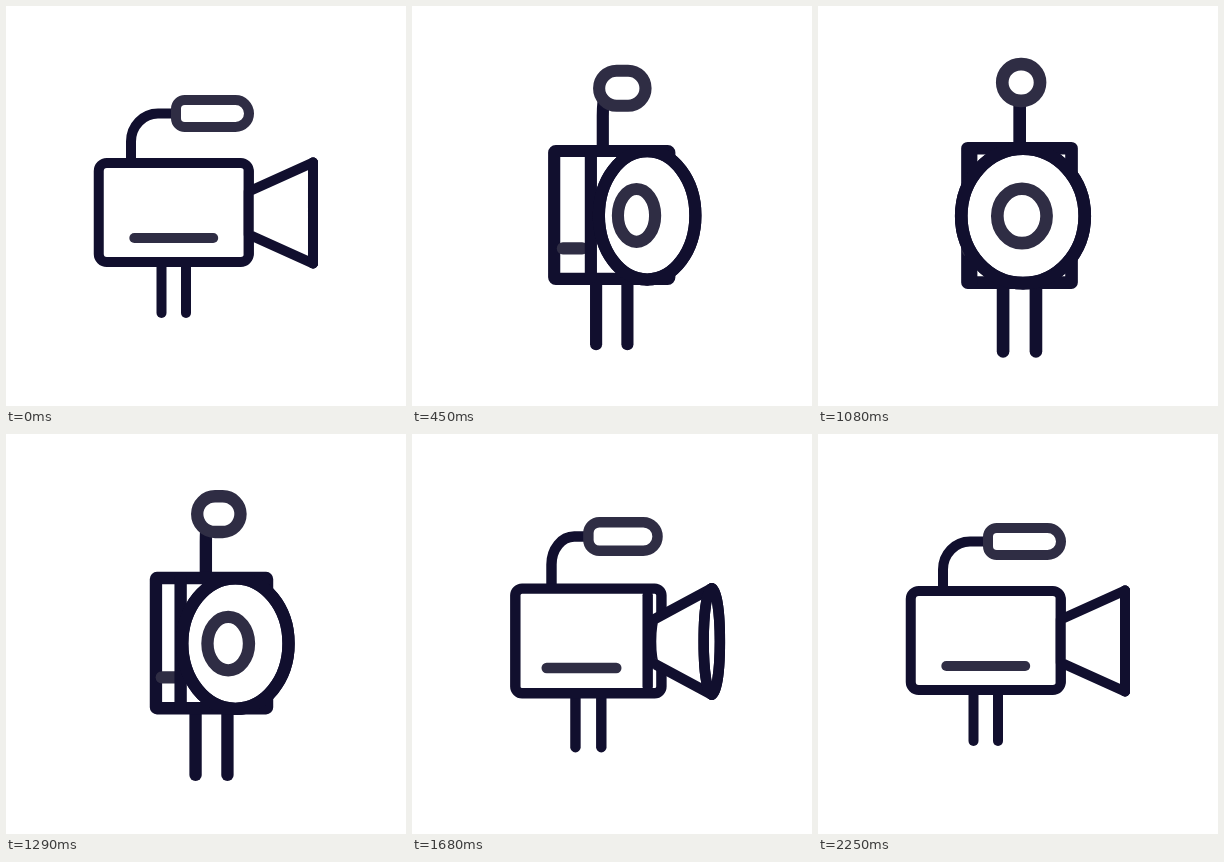
Write an HTML page with a canvas that moves like this. It is 400 by 400 pixels and loops after 2.28 s.

```html
<!DOCTYPE html>
<html lang="en">
<head>
<meta charset="utf-8">
<title>Turning camera</title>
<style>
html, body { margin: 0; height: 100%; overflow: hidden; background: #fff; }
canvas { display: block; }
</style>
</head>
<body>
<canvas id="stage" width="400" height="400"></canvas>
<script>
const ctx = document.getElementById('stage').getContext('2d');
const LOOP = 2280, NAVY = '#110f2e', GRAY = '#2f2d44';

// [time, value]: turn goes from side view (0) to front view (1)
const TURN = [[0, 0], [130, .15], [270, .48], [450, .8], [540, .9], [690, .985], [810, 1], [990, 1],
  [1110, .975], [1290, .87], [1530, .5], [1650, .215], [1770, .04], [1890, 0], [LOOP, 0]];
const CENTER = [[0, 167.75], [150, 188], [300, 199], [450, 199.75], [570, 200.5], [810, 199.2], [1080, 201.5],
  [1290, 205.5], [1530, 195.5], [1650, 180], [1770, 168], [1890, 164.25], [2220, 167.75], [LOOP, 167.75]];

// Monotone cubic interpolation through the keys
function sample(keys, t) {
  const secant = i => (keys[i + 1][1] - keys[i][1]) / (keys[i + 1][0] - keys[i][0]);
  const slope = i => {
    if (i === 0 || i === keys.length - 1) return 0;
    const a = secant(i - 1), b = secant(i);
    return a * b > 0 ? 2 * a * b / (a + b) : 0;
  };
  let i = 0;
  while (i < keys.length - 2 && t >= keys[i + 1][0]) i++;
  const [t0, v0] = keys[i], [t1, v1] = keys[i + 1];
  const d = t1 - t0, s = (t - t0) / d, r = 1 - s;
  return v0 * r * r * (1 + 2 * s) + v1 * s * s * (3 - 2 * s) +
    d * s * r * (slope(i) * r - slope(i + 1) * s);
}

function shape(color, filled, build) {
  ctx.beginPath();
  build();
  if (filled) {
    ctx.fillStyle = '#fff';
    ctx.fill();
  }
  ctx.strokeStyle = color;
  ctx.stroke();
}

function line(color, x1, y1, x2, y2) {
  shape(color, false, () => {
    ctx.moveTo(x1, y1);
    ctx.lineTo(x2, y2);
  });
}

function draw(t) {
  const u = sample(TURN, t), c = sample(CENTER, t);
  const mix = (a, b, bend = 0) => a + (b - a) * u + bend * u * (1 - u);
  const top = mix(157, 142), bottom = mix(256, 277), midY = mix(207, 210);
  const half = 75 - 23.5 * u ** 1.35;
  const left = c - half, right = c + half;
  const edge = Math.min(right, c + mix(75, -51, 32));
  const corner = 8 * (1 - u);

  ctx.clearRect(0, 0, 400, 400);
  ctx.lineWidth = mix(10, 12.7);
  ctx.lineCap = ctx.lineJoin = 'round';

  // Microphone arm and microphone
  const micX = c + mix(38.75, .8, 14), micY = mix(107.5, 76);
  const micW = mix(36.5, 18.5, 7), micH = mix(13.5, 18.5);
  const armX = c + mix(-42.75, 1, -8), reach = 27 * (1 - u);
  shape(NAVY, false, () => {
    ctx.moveTo(armX, top);
    ctx.ellipse(armX + reach, micY + 28, reach, 28, 0, Math.PI, 1.5 * Math.PI);
    ctx.lineTo(micX, micY);
  });
  const micLeft = micH * (.65 + .35 * Math.min(1, 2 * u));
  shape(GRAY, true, () => ctx.roundRect(micX - micW, micY - micH, 2 * micW, 2 * micH,
    [micLeft, micH, micH, micLeft]));

  // Legs
  const spread = mix(12.25, 16.5);
  for (const x of [c - spread, c + spread]) line(NAVY, x, bottom, x, mix(307, 346));

  // Body, side mark and the edge between side and front
  shape(NAVY, true, () => ctx.roundRect(left, top, right - left, bottom - top, corner));
  const markY = mix(232, 245), side = edge - left;
  line(GRAY, left + side * .237, markY, left + side * .763, markY);
  line(NAVY, edge, top + corner, edge, bottom - corner);

  // Neck, hood and inner lens
  const hoodX = c + mix(139.25, .5, 46), hoodRx = Math.max(0, mix(0, 63, -14)), hoodRy = mix(50.5, 67.5);
  const neckX = (edge + right) / 2, neckRy = mix(21.5, 27);
  const hood = () => ctx.ellipse(hoodX, midY, hoodRx, hoodRy, 0, 0, 2 * Math.PI);
  shape(NAVY, true, () => {
    ctx.moveTo(hoodX, midY + hoodRy);
    ctx.ellipse(neckX, midY, 22 * u, neckRy, 0, Math.PI / 2, 1.5 * Math.PI);
    ctx.lineTo(hoodX, midY - hoodRy);
  });
  shape(NAVY, true, hood);
  ctx.save();
  ctx.beginPath();
  hood();
  ctx.clip();
  shape(GRAY, false, () => ctx.ellipse(c + (hoodX - c) * .7, midY,
    Math.max(0, mix(0, 25.2, -10)), mix(23, 27.3), 0, 0, 2 * Math.PI));
  ctx.restore();
  shape(NAVY, false, hood);
}

function tick() {
  draw(performance.now() % LOOP);
  requestAnimationFrame(tick);
}
tick();
</script>
</body>
</html>
```
